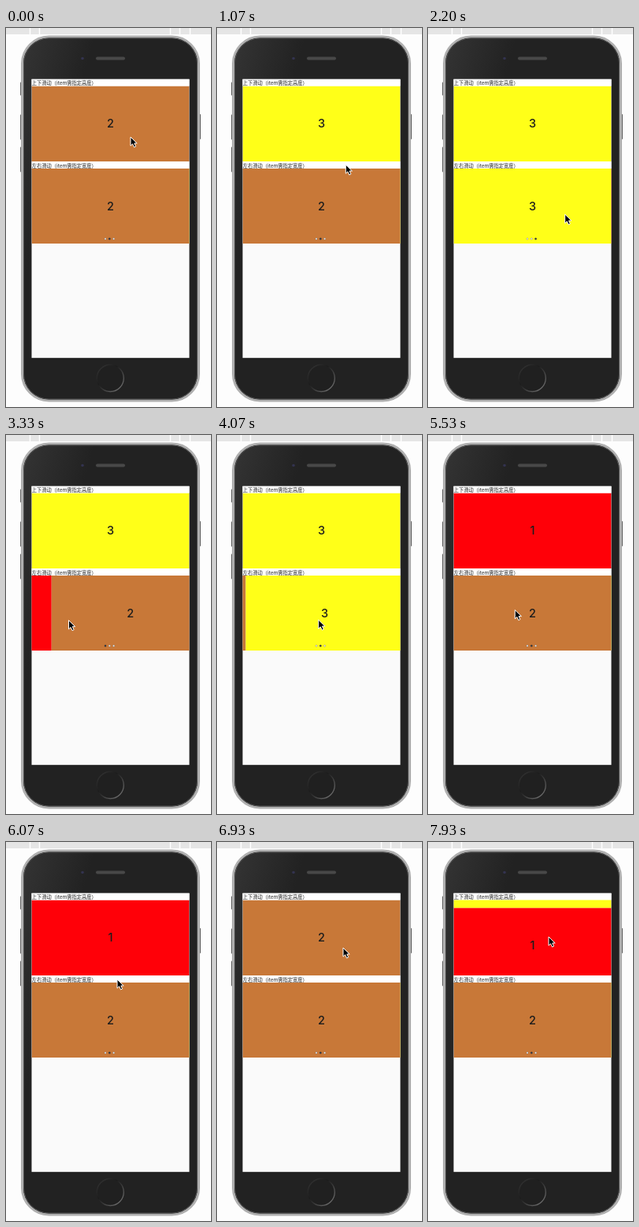
An HTML page for the animation above (8 s loop, 260 px wide and 480 px high).

```html
<!DOCTYPE html>
<html lang="zh">
<head>
<meta charset="utf-8">
<title>Swiper</title>
<style>
html, body { margin: 0; width: 100%; height: 100%; overflow: hidden; background: #fdfdfd; }
svg { display: block; width: 260px; height: 480px; }
.label { font: 6.25px "Noto Sans CJK SC", "Noto Sans CJK", sans-serif; fill: #222; }
.num { font: 500 14.5px Inter, sans-serif; fill: #1c1c1c; text-anchor: middle; }
</style>
</head>
<body>
<svg viewBox="0 0 260 480">
  <defs>
    <linearGradient id="ring" x1="0" y1="0" x2="1" y2="1">
      <stop offset="0" stop-color="#3a3a3a"/><stop offset=".4" stop-color="#1c1c1c"/><stop offset="1" stop-color="#808080"/>
    </linearGradient>
    <linearGradient id="body" x1="0" y1="0" x2=".5" y2=".3">
      <stop offset="0" stop-color="#343434"/><stop offset=".6" stop-color="#222"/>
    </linearGradient>
    <clipPath id="clipTop"><rect x="32.5" y="73.5" width="200" height="95.5"/></clipPath>
    <clipPath id="clipBottom"><rect x="32.5" y="178" width="200" height="95"/></clipPath>
  </defs>
  <rect width="260" height="480" fill="#fdfdfd"/>
  <rect width="260" height="8" fill="#e5e5e5"/>
  <path d="M30.5 0v8M42.5 0v8M208.5 0v8M220.5 0v8M233.5 0v8" stroke="#fff" stroke-width="1.5"/>
  <g fill="#666">
    <rect x="18" y="68.5" width="4" height="17" rx="1"/>
    <rect x="18" y="109.5" width="4" height="32" rx="1"/>
    <rect x="18" y="150.5" width="4" height="32" rx="1"/>
    <rect x="243" y="109" width="4" height="32" rx="1"/>
  </g>
  <rect x="20.5" y="11" width="224" height="461" rx="34" fill="#222" stroke="#b0b0b0" stroke-width="3"/>
  <rect x="22.5" y="13" width="220" height="457" rx="32" fill="url(#body)" stroke="#555"/>
  <circle cx="97" cy="38.5" r="1.8" fill="#33334f"/>
  <rect x="114" y="36.5" width="37" height="4" rx="2" fill="#484848"/>
  <circle cx="132.3" cy="443.5" r="17" fill="#202020" stroke="url(#ring)" stroke-width="1.3"/>
  <rect x="32.5" y="64.8" width="200" height="353" fill="#fafafa"/>
  <rect x="32.5" y="64.8" width="200" height="8.7" fill="#fff"/>
  <rect x="32.5" y="169" width="200" height="9" fill="#fff"/>
  <text class="label" x="32.8" y="72.2">上下滑动（item需指定高度）</text>
  <text class="label" x="32.8" y="176.5">左右滑动（item需指定宽度）</text>
  <g id="top" clip-path="url(#clipTop)"></g>
  <g id="bottom" clip-path="url(#clipBottom)"></g>
  <g id="dots" stroke="#000" stroke-opacity=".3" stroke-width=".5"></g>
  <g id="tap" fill="none">
    <circle r="13.8" stroke="#fff" stroke-width="3.6"/>
    <circle r="13.8" stroke="#111" stroke-width="2"/>
  </g>
  <path id="cursor" d="M0 0V11.2L2.6 8.8L4.5 13L6.6 12L4.8 8H8.2Z" fill="#000" stroke="#fff" stroke-width="1"/>
</svg>
<script>
const LOOP = 8000, SLIDE = 560, PRESS = 50;
const COLORS = ['#ff0008', '#c87838', '#ffff18'];
const $ = id => document.getElementById(id);

function el(parent, tag, attrs) {
  const node = document.createElementNS('http://www.w3.org/2000/svg', tag);
  for (const key in attrs) node.setAttribute(key, attrs[key]);
  return parent.appendChild(node);
}

function carousel(id, y, height, dx, dy, swipes) {
  const panes = COLORS.map((fill, i) => {
    const g = el($(id), 'g', {});
    el(g, 'rect', { x: 32.5, y, width: 200, height, fill });
    el(g, 'text', { class: 'num', x: 132.5, y: y + height / 2 + 5.2 }).textContent = i + 1;
    return g;
  });
  return { panes, dx, dy, swipes };
}

// Each swipe starts at `at`; automatic ones have no pointer press.
const upper = carousel('top', 73.5, 95.5, 0, 95.5, [
  { at: 150 }, { at: 4100, auto: true }, { at: 6280 }, { at: 6985 }, { at: 7551 }
]);
const lower = carousel('bottom', 178, 95, 200, 0, [
  { at: 1450, auto: true }, { at: 2330 }, { at: 2970 }, { at: 3590 }, { at: 4209 }, { at: 4775 }
]);
const dots = [126, 131.3, 136.6].map(cx => el($('dots'), 'circle', { cx, cy: 267, r: 1.2 }));

const manual = c => c.swipes.filter(s => !s.auto);
const drag = (from, to) => s => [
  [s.at - PRESS, ...from], [s.at + 250, ...to], [s.at + 380, ...to]
];
const path = [
  [0, 158, 138],
  ...manual(upper).flatMap(drag([160, 134], [153, 120])),
  ...manual(lower).flatMap(drag([168.7, 233.7], [79.5, 234.7])),
  [900, 160, 140], [1400, 172, 262], [1700, 178, 287], [1850, 180, 307],
  [2050, 176, 252], [2200, 173.7, 236],
  [5500, 110, 222], [6070, 141, 174],
  [LOOP, 154, 123]
].sort((a, b) => a[0] - b[0]);
const presses = [...manual(upper), ...manual(lower)].map(s => s.at - PRESS);

function pointer(t) {
  const i = Math.max(1, path.findIndex(p => p[0] > t));
  const [t0, x0, y0] = path[i - 1], [t1, x1, y1] = path[i];
  const u = (t - t0) / (t1 - t0), k = u * u * (3 - 2 * u);
  return [x0 + (x1 - x0) * k, y0 + (y1 - y0) * k];
}

// Both carousels begin on the second pane.
function position(c, t) {
  return c.swipes.reduce((pos, s) => {
    const u = Math.min(1, Math.max(0, (t - s.at) / SLIDE));
    return pos + 1 - (1 - u) ** 2;
  }, 1);
}

function place(c, t) {
  const pos = position(c, t), index = Math.floor(pos), shift = pos - index;
  c.panes.forEach((pane, i) => {
    const step = (i - index % 3 + 3) % 3;
    pane.style.display = step < 2 ? '' : 'none';
    pane.setAttribute('transform', `translate(${c.dx * (step - shift)} ${c.dy * (step - shift)})`);
  });
  return index % 3;
}

function render(t) {
  place(upper, t);
  const active = place(lower, t);
  dots.forEach((dot, i) => dot.setAttribute('fill', i === active ? '#3c404a' : '#e4e4e4'));
  const [x, y] = pointer(t);
  const move = `translate(${x} ${y})`;
  $('cursor').setAttribute('transform', move);
  $('tap').setAttribute('transform', move);
  $('tap').style.display = presses.some(p => t >= p && t < p + 210) ? '' : 'none';
}

const start = performance.now();
function tick() {
  render((performance.now() - start) % LOOP);
  requestAnimationFrame(tick);
}
tick();
</script>
</body>
</html>
```
